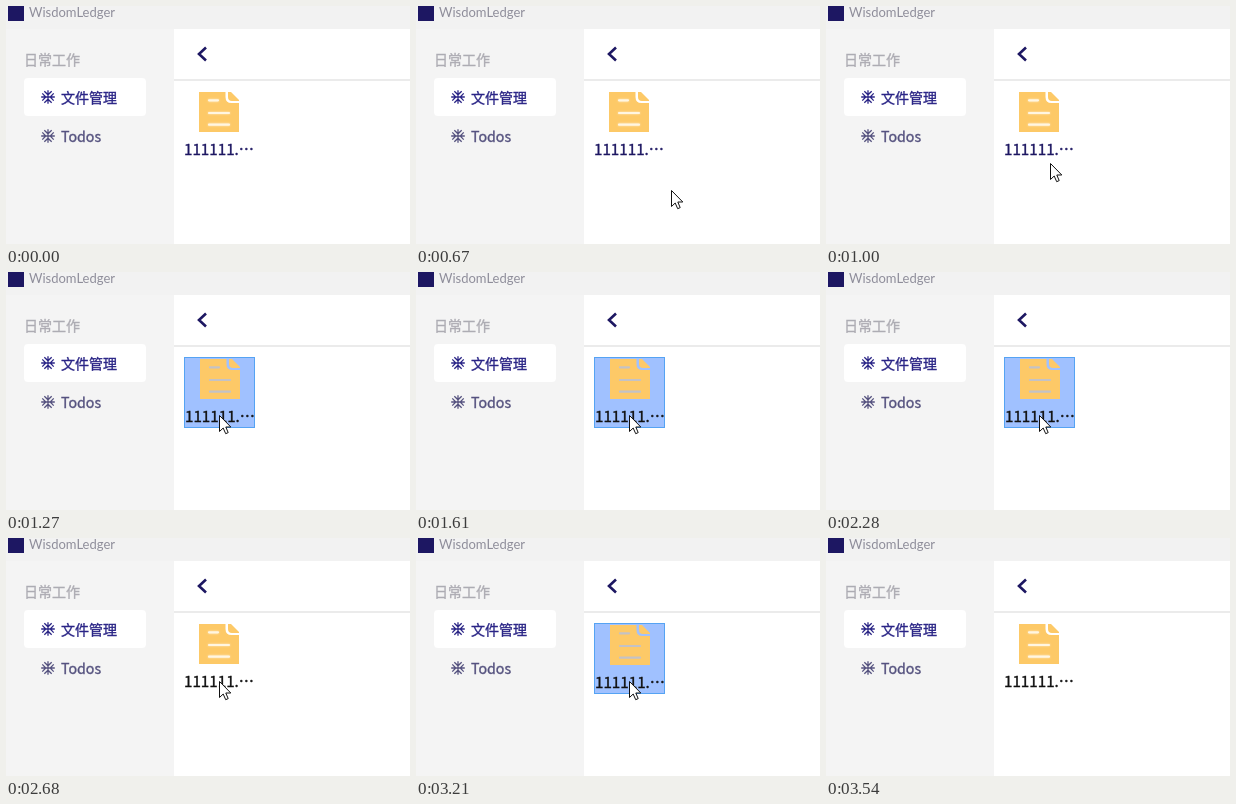
Recreate the animation shown at these times as an HTML page. Size 404 by 238 pixels, loop 4.21 s.

```html
<!DOCTYPE html>
<html lang="zh-CN">
<head>
<meta charset="utf-8">
<title>文件管理</title>
<style>
  html, body { margin: 0; width: 100%; height: 100%; overflow: hidden; background: #fff; }
  svg { display: block; width: 404px; height: 238px; }
  text { font: 14px "Noto Sans CJK SC", "Noto Sans CJK", "Noto Sans", sans-serif; }
  /* A hairline stroke gives the medium weight */
  .medium { stroke: currentColor; fill: currentColor; stroke-width: .35; }
  #name { font-size: 15.2px; }
  .snow { fill: none; stroke: currentColor; stroke-width: 1.9; }
  #lines { stroke: #fff6e2; stroke-width: 2.2; stroke-linecap: round; filter: drop-shadow(0 0 1px #fff9); }
  #box { fill: #a0c1ff; stroke: #55a3f3; visibility: hidden; }
  .selected #box { visibility: visible; }
  .selected #lines { stroke: #c3c2c6; filter: none; }
  .selected #file { transform: translate(1px, 1px); }
</style>
</head>
<body>
<svg viewBox="0 0 404 238">
  <defs>
    <path id="arm" d="M0 0V-10M-5.4-8.4L0-3.2L5.4-8.4"/>
    <g id="flake">
      <use href="#arm"/>
      <use href="#arm" transform="rotate(90)"/>
      <use href="#arm" transform="rotate(180)"/>
      <use href="#arm" transform="rotate(270)"/>
    </g>
  </defs>

  <rect width="404" height="23" fill="#f2f2f2"/>
  <rect y="23" width="168" height="215" fill="#f4f4f4"/>
  <rect x="2" width="16" height="15" fill="#1d1762"/>
  <text x="23" y="11.4" fill="#8e8d9a" style="font: 13px Lato, sans-serif">WisdomLedger</text>

  <text class="medium" x="18" y="59" color="#adacb3">日常工作</text>
  <rect x="18" y="72" width="122" height="38" rx="4" fill="#fff"/>
  <g color="#2a2586">
    <use class="snow" href="#flake" transform="translate(42 91) scale(.68)"/>
    <text class="medium" x="55" y="97">文件管理</text>
  </g>
  <g color="#55527f">
    <use class="snow" href="#flake" transform="translate(42 130) scale(.68)"/>
    <text class="medium" x="55" y="136" style="font-size: 14.2px">Todos</text>
  </g>

  <path d="M200 41.5L193 48L200 54.5" fill="none" stroke="#1d1762" stroke-width="2.6"/>
  <rect x="168" y="73" width="236" height="2" fill="#ebebeb"/>

  <g id="item">
    <rect id="box" x="178.5" y="85.5" width="70" height="70"/>
    <g id="file">
      <path d="M193 86H219.5V91Q219.5 97 225.5 97H233V126H193ZM222 86H225L233 94V95H226Q222 95 222 91Z" fill="#fdc967"/>
      <path id="lines" d="M203 94.3H212M203 107H223M203 118.7H223"/>
      <text id="name" class="medium" x="178" y="149">111111.…</text>
    </g>
  </g>

  <path id="cursor" d="M.5.5V16.5L4.2 13L6.7 18.7L9.2 17.6L6.8 12H11.8Z" fill="#fff" stroke="#111"/>
</svg>
<script>
  const LOOP = 4210, TICK = 66.83;
  const $ = id => document.getElementById(id);

  // Pointer path: tick, x, y
  const path = [
    [7, 382, 224], [8, 328, 211], [9, 284, 197], [10, 255, 184], [12, 238, 170],
    [14, 228, 161], [18, 213, 143], [49, 213, 143], [50, 226, 158], [51, 265, 190], [52, 363, 226]
  ];
  // Ticks at which the selection flips
  const clicks = [19, 21, 24, 27, 28, 32, 34, 38, 39, 40, 48, 49];

  function pointer(tick) {
    const i = path.findIndex(p => p[0] >= tick);
    if (i < 0 || tick < path[0][0]) return null;
    const b = path[i], a = path[Math.max(i - 1, 0)];
    const k = (tick - a[0]) / (b[0] - a[0] || 1);
    return [1, 2].map(n => Math.round(a[n] + (b[n] - a[n]) * k));
  }

  function draw(ms) {
    const tick = Math.floor((ms % LOOP + 8) / TICK);
    const pos = pointer(tick);
    $("cursor").style.visibility = pos ? "visible" : "hidden";
    if (pos) $("cursor").setAttribute("transform", `translate(${pos})`);

    const count = clicks.filter(c => c <= tick).length;
    $("item").classList.toggle("selected", count % 2 === 1);
    $("name").style.color = count ? "#111" : "#1d1762";
  }

  const start = performance.now();
  function frame() {
    draw(performance.now() - start);
    requestAnimationFrame(frame);
  }
  frame();
</script>
</body>
</html>
```
